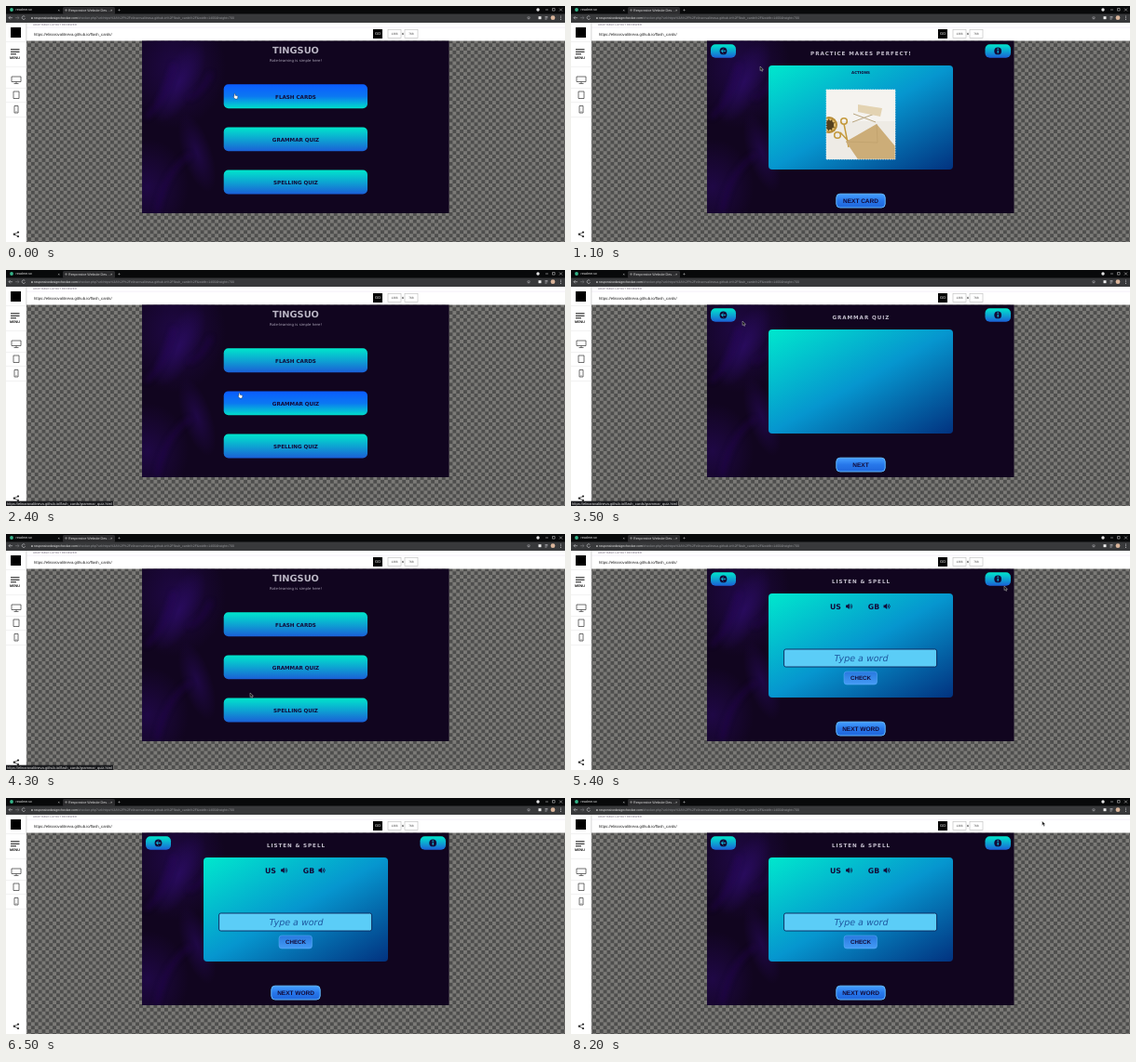
Recreate the animation shown at these times as an HTML page. Size 600x254 px, loop 8600 ms.

```html
<!DOCTYPE html>
<html lang="en">
<head>
<meta charset="utf-8">
<title>Flash cards walkthrough</title>
<style>
html, body { margin: 0; width: 100%; height: 100%; overflow: hidden; background: #555; }
svg { display: block; width: 100vw; height: 100vh; }
text { font-family: "Liberation Sans", Arial, sans-serif; text-rendering: geometricPrecision; }
.wide { font-family: "DejaVu Sans", Verdana, sans-serif; }
.bold { font-weight: bold; }
.mid { text-anchor: middle; }
.italic { font-style: italic; }
</style>
</head>
<body>
<svg id="stage" viewBox="0 0 600 254" preserveAspectRatio="none"></svg>
<script>
const LOOP = 8600, STEP = 100;
const INK = '#130a38';
const SITE = 'https://elinarovalitneva.github.io/flash_cards/';
// A 33 px tile on a 2560 px wide desktop, shown 600 px wide.
const TILE = 33 * 600 / 2560, CELL = TILE / 2;

const rect = (x, y, w, h, fill, more = '') =>
  `<rect x="${x}" y="${y}" width="${w}" height="${h}" fill="${fill}" ${more}/>`;
const text = (x, y, size, label, fill, cls = '', more = '') =>
  `<text x="${x}" y="${y}" font-size="${size}" fill="${fill}" class="${cls}" ${more}>${label}</text>`;
const path = (d, stroke, width = 1, fill = 'none', more = '') =>
  `<path d="${d}" stroke="${stroke}" stroke-width="${width}" fill="${fill}" ${more}/>`;
const circle = (x, y, r, fill, more = '') => `<circle cx="${x}" cy="${y}" r="${r}" fill="${fill}" ${more}/>`;
const group = (id, body) => `<g id="${id}">${body}</g>`;
const gradient = (id, dir, ...colors) =>
  `<linearGradient id="${id}" x1="0" y1="0" x2="${dir[0]}" y2="${dir[1]}">` +
  colors.map((c, i) => `<stop offset="${i / (colors.length - 1)}" stop-color="${c}"/>`).join('') +
  '</linearGradient>';
const glow = (id, color) =>
  `<radialGradient id="${id}"><stop stop-color="${color}"/><stop offset="1" stop-color="${color}" stop-opacity="0"/></radialGradient>`;

const defs = `<defs>
  <pattern id="checks" width="${TILE}" height="${TILE}" patternUnits="userSpaceOnUse" x="54" y="222">
    ${rect(0, 0, TILE, TILE, '#4e4e4d')}${rect(0, 0, CELL, CELL, '#7b7a77')}${rect(CELL, CELL, CELL, CELL, '#7b7a77')}
  </pattern>
  ${gradient('calm', [0, 1], '#00e6cb', '#0da5d2', '#1b5fd6')}
  ${gradient('hot', [0, 1], '#0b5cff', '#0b78f2', '#00dfca')}
  ${gradient('card', [1, 1], '#00e8cd', '#0696cf', '#02327f')}
  ${gradient('next', [0, 1], '#46a0ff', '#2777ea', '#1f66dc')}
  ${gradient('check', [0, 1], '#2878df', '#459bf5')}
  ${glow('violet', '#280b5c')}${glow('plum', '#1f0845')}
  <filter id="soft" x="-50%" y="-50%" width="200%" height="200%"><feGaussianBlur stdDeviation="3"/></filter>
  <clipPath id="screen">${rect(146, 37.5, 329.5, 185.5, '#000')}</clipPath>
  <clipPath id="photo">${rect(274, 90, 74, 75, '#000')}</clipPath>
</defs>`;

function browserBar() {
  const tab = '#dcdcdc', icon = '#c8c8cc';
  return rect(0, 0, 600, 9, '#08090a') + rect(61, 1, 56, 8, '#2b2b2d', 'rx="1.5"') +
    rect(0, 8.5, 600, 9.5, '#38393b') +
    circle(6, 4, 1.9, '#35b58a') + text(10.5, 5.3, 3.7, 'readme.so', tab) +
    text(55.5, 5.5, 4, '×', tab) +
    circle(64.5, 4.5, 1.2, '#777') + text(67, 5.6, 3.7, 'Responsive Website Des…', tab) +
    text(112, 5.6, 4, '×', tab) + text(120, 5.8, 5, '+', tab) +
    circle(571, 4, 1.7, '#e4e4e4') +
    path('M579 4h3M586.5 2.5h2.6v2.6h-2.6zM594 2.5l3 3m0-3l-3 3', '#ddd', .5) +
    path('M7 12.7H3m1.7-1.7L3 12.7l1.7 1.7', icon, .6) +
    path('M10 12.7h4m-1.7-1.7l1.7 1.7-1.7 1.7', '#7d7d82', .6) +
    path('M20.3 11.5a1.8 1.8 0 1 0 .3 1.7', icon, .6) +
    rect(27, 12.2, 1.8, 1.7, '#aaa') +
    text(30, 14, 3.5, 'responsivedesignchecker.com<tspan fill="#98999d">/checker.php?url=https%3A%2F%2Felinarovalitneva.github.io%2Fflash_cards%2F&amp;width=1400&amp;height=700</tspan>', '#eee') +
    path('M561 11.3l.5 1h1l-.8.7.3 1.1-1-.6-1 .6.3-1.1-.8-.7h1z', icon, .4) +
    rect(571.5, 11.2, 3, 3, '#ececec') + path('M578.5 11.5h3M578.5 12.8h3M578.5 14.1h2', icon, .6) +
    circle(587, 12.7, 2.4, '#d9b49a') +
    [11, 12.7, 14.4].map(y => circle(595.5, y, .5, icon)).join('');
}

function toolHeader() {
  const box = x => rect(x, 25.5, 14, 9, '#fff', 'stroke="#bbb" stroke-width=".6"');
  return rect(0, 18, 600, 19.5, '#fff') +
    text(29, 21.3, 3, 'ADAPTABLE LAYOUT REVIEWER', '#7d7387') +
    rect(22, 22.8, 578, .5, '#e6dff0') +
    text(30, 31.6, 4.25, SITE, '#222') +
    rect(394, 25, 10, 10, '#000') + text(399, 31.4, 4, 'GO', '#fff', 'mid') +
    box(410) + text(417, 31.3, 3.2, '1366', '#444', 'mid') +
    text(425.8, 31.2, 4, 'x', '#333', 'mid bold') +
    box(428) + text(435, 31.3, 3.2, '768', '#444', 'mid');
}

function sidebar() {
  const lines = [38, 65, 88, 103, 119].map(y => rect(0, y, 22, .5, '#e4e4e4')).join('');
  return rect(0, 18, 22, 236, '#fff') + rect(21.6, 18, .6, 236, '#bbb') + lines +
    rect(5, 23, 11, 11, '#000') +
    path('M5 46.8h9.5M5 49.3h9.5M5 51.8h6', '#111', 1) +
    text(9.5, 57.3, 3.7, 'MENU', '#111', 'mid bold') +
    path('M6 76h10v5.5H6zM11 81.5v2M8.5 83.5h5', '#333', .7) +
    path('M8 92h6v7.5H8z', '#333', .7) +
    path('M9 107.5h4v7.5H9zM10.5 113.8h1', '#333', .7) +
    path('M13 243.5l-4.5 2.2 4.5 2.2', '#222', .7) +
    circle(13, 243.5, 1.1, '#222') + circle(8.8, 245.7, 1.1, '#222') + circle(13, 248, 1.1, '#222');
}

function nebula() {
  const cloud = (x, y, rx, ry, id, turn = 0) =>
    `<ellipse cx="${x}" cy="${y}" rx="${rx}" ry="${ry}" fill="url(#${id})" transform="rotate(${turn} ${x} ${y})"/>`;
  return rect(146, 37, 330, 186, '#11051f') + cloud(180, 66, 56, 66, 'plum') +
    cloud(186, 82, 20, 48, 'violet', 28) + cloud(152, 195, 44, 52, 'plum') +
    cloud(205, 158, 16, 44, 'plum', -18) +
    path('M150 120q22-18 30-58M196 100q16-8 24-28M162 222q8-44 36-62', '#2d0e66', 3, 'none', 'filter="url(#soft)" opacity=".6"');
}

const hits = [];
function hotBox(page, x, y, w, h) {
  hits.push({ page, x, y, w, h, id: 'hit' + hits.length });
  return rect(x, y, w, h, 'url(#calm)', `rx="5" id="${hits.at(-1).id}"`);
}

function homePage() {
  const item = (i, label) => {
    const y = 84.3 + 46.1 * i;
    return hotBox('home', 233.7, y, 154.3, 25.9) + text(311, y + 15.3, 5.6, label, INK, 'wide bold mid');
  };
  return text(311, 50.6, 9.8, 'TINGSUO', '#b9b4c3', 'wide bold mid') +
    text(311, 59.8, 3.9, 'Rote-learning is simple here!', '#a9a2b5', 'wide mid') +
    ['FLASH CARDS', 'GRAMMAR QUIZ', 'SPELLING QUIZ'].map((label, i) => item(i, label)).join('');
}

function studyPage(page, title, next, body) {
  const frame = hotBox(page, 150, 41.3, 27, 14.5) + circle(163.5, 48.4, 3.9, INK) +
    path('M166 48.4h-4.6m2-2l-2 2 2 2', '#10b6d6', 1) +
    hotBox(page, 444.5, 41.3, 27.5, 14.5) + circle(458.2, 48.4, 3.9, INK) +
    rect(457.6, 47.7, 1.3, 3, '#10b6d6') + circle(458.2, 46.2, .8, '#10b6d6');
  return frame +
    text(311.4, 52.7, 5.6, title, '#c4bfcd', 'wide bold mid', 'letter-spacing=".94"') +
    rect(212, 64, 198, 112, 'url(#card)', 'rx="4"') + body +
    rect(284.8, 202.2, 52.4, 14.8, 'url(#next)', 'rx="4" stroke="#62b8fb"') +
    text(311, 211.8, 6.5, next, INK, 'bold mid');
}

function stillLife() {
  const gold = '#c59a3e', ring = `stroke="${gold}" stroke-width="1.6"`;
  return '<g clip-path="url(#photo)">' + rect(274, 90, 74, 75, '#eeebe5') +
    rect(274, 90, 74, 34, '#f5f3ef') +
    circle(277, 128, 9, '#b78c36') + circle(277, 128, 6, '#54401d', 'stroke="#e1bd70" stroke-dasharray="2 1.5" stroke-width="2"') +
    path('M293 127l5 25M289 136l13 14', gold, 1.5) +
    circle(293, 124, 3.3, 'none', ring) + circle(286, 139, 3.3, 'none', ring) +
    path('M303 116l24 9M302 125l24-9', '#b9a680', 1) +
    path('M308 106l26 4-2 9-24-5z', 'none', 0, '#e3d3b2') +
    path('M295 146l33-19 20 24v14h-40z', 'none', 0, '#ccad78') +
    path('M295 146l34 1-1-20', '#b99a66', .5) + '</g>' +
    rect(274, 90, 74, 75, 'none', 'stroke="#e9f1f3" stroke-width=".8" stroke-dasharray="1.6 1"');
}

const speaker = x => path(`M${x} 76.6h1.6l2.1-1.9v6.4l-2.1-1.9H${x}z`, 'none', 0, INK) +
  path(`M${x + 4.6} 76.4q1.1 1.5 0 3M${x + 5.7} 75.3q2.1 2.6 0 5.2`, INK, .8);

const spelling = text(284, 80.9, 7.8, 'US', INK, 'wide bold mid') + speaker(295) +
  text(325, 80.9, 7.8, 'GB', INK, 'wide bold mid') + speaker(335.5) +
  rect(228.6, 124, 164, 19, '#5bcdf7', 'rx="2" stroke="#0d2357" stroke-width=".9"') +
  text(311.5, 136.9, 9.5, 'Type a word', '#1d579f', 'wide italic mid') +
  rect(293, 148, 35.5, 14, 'url(#check)', 'rx="3" stroke="#5db2fa" stroke-width=".5"') +
  text(311, 157.2, 6.2, 'CHECK', INK, 'bold mid');

const flash = text(311, 73.4, 4, 'ACTIONS', INK, 'wide bold mid') + stillLife();

const modal = rect(146, 37, 330, 186, '#05020c', 'opacity=".65"') +
  rect(212, 64, 198, 112, 'url(#card)', 'rx="4"') +
  text(311, 80, 5.6, 'LISTEN &amp; SPELL', INK, 'wide bold mid');

const arrow = path('M0 0v4.6l1.1-1 .8 1.8.9-.4-.8-1.7h1.5z', '#ddd', .4, '#111');
const hand = path('M0-.5q.7-.6 1 .2l.2 1.6 2.2.5q.6.3.4 1.2l-.5 2H.9L-1 2.8q0-.8.9-.2z', '#111', .35, '#fff');

document.getElementById('stage').innerHTML = defs +
  rect(22, 37, 578, 217, 'url(#checks)') + browserBar() + toolHeader() + sidebar() +
  '<g clip-path="url(#screen)">' + nebula() +
  group('home', homePage()) +
  group('flash', studyPage('flash', 'PRACTICE MAKES PERFECT!', 'NEXT CARD', flash)) +
  group('grammar', studyPage('grammar', 'GRAMMAR QUIZ', 'NEXT', '')) +
  group('spell', studyPage('spell', 'LISTEN &amp; SPELL', 'NEXT WORD', spelling)) +
  group('modal', modal) + '</g>' +
  group('status', rect(0, 248.7, 112, 5.3, '#17181b', 'id="statusBox"') + text(1, 252.7, 4, '', '#d8d8d8', '', 'id="link"')) +
  group('cursor', group('arrow', arrow) + group('hand', hand));

// Time, value: each value holds until the next.
const pages = [[0, 'home'], [500, 'flash'], [1900, 'home'], [2800, 'grammar'], [3900, 'home'], [4700, 'spell']];
const links = [[0, ''], [100, 'flash_cards.html'], [600, ''], [1500, 'index.html'], [2000, ''],
  [2200, 'flash_cards.html'], [2400, 'grammar_quiz.html'], [3600, 'index.html'],
  [4100, 'grammar_quiz.html'], [4500, 'spelling_quiz.html'], [4800, '']];
const modals = [[0, false], [5600, true], [6000, false]];

// Time, x, y of the pointer tip; straight moves between entries.
const track = [[0, 245, 95], [300, 246, 97], [600, 246, 97], [1100, 203, 65], [1300, 179, 57],
  [1400, 179, 57], [1500, 168, 50], [1700, 163, 48], [1900, 163, 48], [2400, 250, 133],
  [2700, 252, 141], [3200, 252, 141], [3300, 240, 118], [3500, 184, 55], [3700, 164, 48],
  [3900, 164, 48], [4300, 262, 171], [4500, 268, 188], [4700, 268, 188], [5400, 465, 56],
  [5500, 465, 56], [5600, 461, 52], [5900, 461, 52], [6400, 481, 36], [6500, -20, -20],
  [7500, -20, -20], [7600, 505.7, 14], [7800, 505.7, 32], [7900, 505.7, 32],
  [8000, 505.7, 30], [8200, 505.7, 25], [LOOP, 505.7, 25]];

const held = (list, t) => list.findLast(row => row[0] <= t)[1];
function pointer(t) {
  const i = track.findLastIndex(row => row[0] <= t);
  const [t0, x0, y0] = track[i], [t1, x1, y1] = track[Math.min(i + 1, track.length - 1)];
  const k = t1 > t0 ? (t - t0) / (t1 - t0) : 0;
  return [x0 + (x1 - x0) * k, y0 + (y1 - y0) * k];
}

const el = id => document.getElementById(id);
const show = (id, on) => el(id).setAttribute('display', on ? 'inline' : 'none');

function draw(now) {
  const t = Math.floor(now % LOOP / STEP) * STEP;
  const page = held(pages, t), link = held(links, t), open = held(modals, t);
  const [x, y] = pointer(t);
  for (const id of ['home', 'flash', 'grammar', 'spell']) show(id, id === page);
  show('modal', open);
  show('status', link !== '');
  el('link').textContent = SITE + link;
  if (link) el('statusBox').setAttribute('width', el('link').getComputedTextLength() + 2);
  let over = false;
  for (const b of hits) {
    const on = !open && b.page === page && x >= b.x && x <= b.x + b.w && y >= b.y && y <= b.y + b.h;
    el(b.id).setAttribute('fill', on ? 'url(#hot)' : 'url(#calm)');
    over ||= on;
  }
  el('cursor').setAttribute('transform', `translate(${x} ${y})`);
  show('hand', over);
  show('arrow', !over);
}

const start = performance.now();
function tick() {
  draw(performance.now() - start);
  requestAnimationFrame(tick);
}
tick();
</script>
</body>
</html>
```
